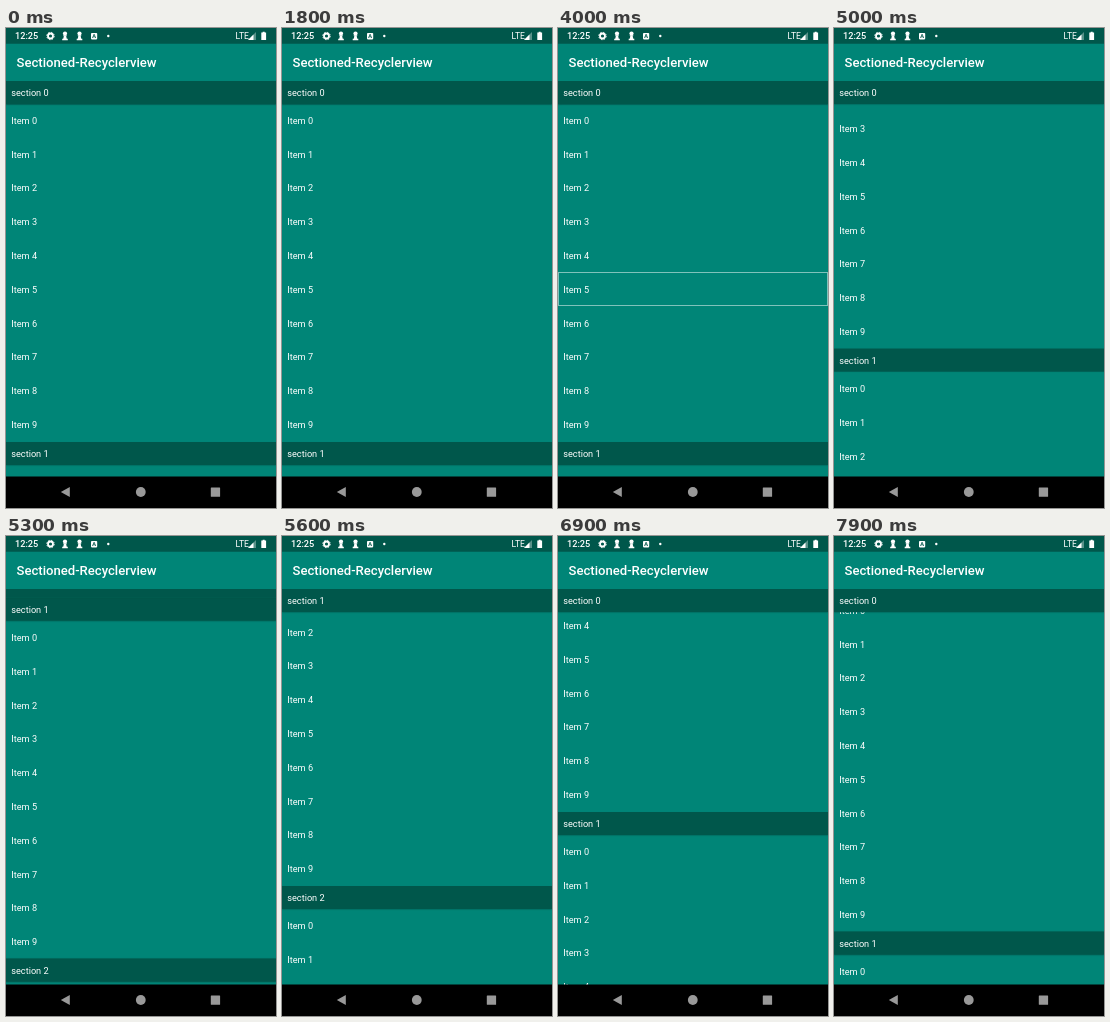
Animation of 270 by 480 pixels, one loop 8000 ms. Source, as an HTML page:

```html
<!DOCTYPE html>
<html lang="en">
<head>
<meta charset="utf-8">
<title>Sectioned list</title>
<style>
html, body { margin: 0; width: 100%; height: 100%; overflow: hidden; background: #000; }
#stage {
  position: relative; width: 270px; height: 480px; overflow: hidden;
  background: #008577; color: #fff; font: 9.19px Roboto, sans-serif;
}
#stage div { position: absolute; left: 0; width: 270px; box-sizing: border-box; white-space: nowrap; }
#stage .list { top: 52.5px; height: 396px; overflow: hidden; }
#stage .sec, #stage .item { padding-left: 5.25px; }
#stage .sec { height: 23.4px; line-height: 23.4px; background: #00574b; box-shadow: 0 .5px 1.5px rgba(0, 40, 34, .5); }
#stage .item { height: 33.78px; line-height: 33.78px; }
#stage .frame { height: 34px; border: 1px solid rgba(255, 255, 255, .5); visibility: hidden; }
#stage .title { top: 15.75px; height: 36.75px; padding-left: 10.5px; font-size: 13.125px; font-weight: 500; line-height: 37.5px; }
svg { position: absolute; left: 0; top: 0; }
</style>
</head>
<body>
<div id="stage">
  <div class="list">
    <div id="rows"></div>
    <div class="sec" id="sticky"></div>
  </div>
  <div class="title">Sectioned-Recyclerview</div>
  <svg width="270" height="480" fill="#fff" font-family="Roboto, sans-serif">
    <path fill="#00574b" d="M0 0h270v15.75H0z"/>
    <text x="9" y="11.4" font-size="9.19" font-weight="500">12:25</text>
    <g fill="none" stroke="#fff">
      <circle cx="44.5" cy="8" r="2.5" stroke-width="1.8"/>
      <circle cx="44.5" cy="8" r="3.7" stroke-width="1" stroke-dasharray="1.5 1.406"/>
    </g>
    <g id="pawn">
      <circle cx="59" cy="5.6" r="2.1"/>
      <path d="M57 7.3h4l-.8 1.2.6 2.2h1v1.5h-5.600v-1.5h1l.6-2.200z"/>
    </g>
    <use href="#pawn" x="14.5"/>
    <rect x="85" y="5" width="6.200" height="6.400" rx=".8"/>
    <path d="M86.500 10l1.600-3.800 1.600 3.800M87.200 8.800h1.800" fill="none" stroke="#00574b" stroke-width=".8"/>
    <circle cx="102.300" cy="8" r="1.200"/>
    <text x="229.500" y="11.200" font-size="8.600">LTE</text>
    <path d="M250 4v8h-8z" opacity=".35"/>
    <path d="M247.500 6.500V12h-5.500z"/>
    <path d="M256.700 3.800h2v.8h1.400v7.400h-4.800V4.600h1.400z"/>
    <path fill="#000" d="M0 448.500h270V480H0z"/>
    <g fill="#999">
      <path d="M54.800 464l9-5v10z"/>
      <circle cx="134.800" cy="464" r="4.900"/>
      <rect x="204.800" y="459.400" width="9.300" height="9.300" rx=".5"/>
    </g>
  </svg>
</div>
<script>
const LOOP = 8000, STEP = 100;
const HEAD = 23.4, ROW = 33.78, COUNT = 10, BLOCK = HEAD + ROW * COUNT;

// [time, scroll offset]
const path = [
  [4700, 0], [4800, 12], [4900, 45], [5000, 93.4], [5100, 185], [5200, 280], [5300, 352.5],
  [5400, 390], [5500, 412], [5600, 425], [5700, 432], [5800, 436], [5900, 438],
  [6400, 438], [6500, 428], [6600, 386], [6700, 322], [6800, 220], [6900, 138],
  [7000, 82], [7100, 44], [7200, 16], [7300, 0], [7800, 0], [7900, 18.5]
];

const rows = document.getElementById('rows');
const sticky = document.getElementById('sticky');

function add(cls, top, text) {
  const el = document.createElement('div');
  el.className = cls;
  el.style.top = top + 'px';
  el.textContent = text;
  rows.append(el);
  return el;
}

for (let s = 0; s < 3; s++) {
  add('sec', s * BLOCK, 'section ' + s);
  for (let i = 0; i < COUNT; i++) add('item', s * BLOCK + HEAD + i * ROW, 'Item ' + i);
}
const frame = add('frame', HEAD + 5 * ROW - .5, '');

function scrollAt(t) {
  const n = path.findIndex(p => p[0] >= t);
  if (n < 0) return path[path.length - 1][1];
  if (n === 0) return path[0][1];
  const [t0, a] = path[n - 1], [t1, b] = path[n];
  return a + (b - a) * (t - t0) / (t1 - t0);
}

function draw(now) {
  const t = Math.floor((now % LOOP) / STEP) * STEP;
  const y = scrollAt(t);
  const s = Math.floor(y / BLOCK);
  const push = Math.min(0, (s + 1) * BLOCK - y - HEAD);
  rows.style.transform = `translateY(${-y}px)`;
  sticky.style.transform = `translateY(${push}px)`;
  sticky.textContent = 'section ' + s;
  frame.style.visibility = t >= 3300 && t < 4800 ? 'visible' : 'hidden';
}

const start = performance.now();
function tick() {
  draw(performance.now() - start);
  requestAnimationFrame(tick);
}
tick();
</script>
</body>
</html>
```
